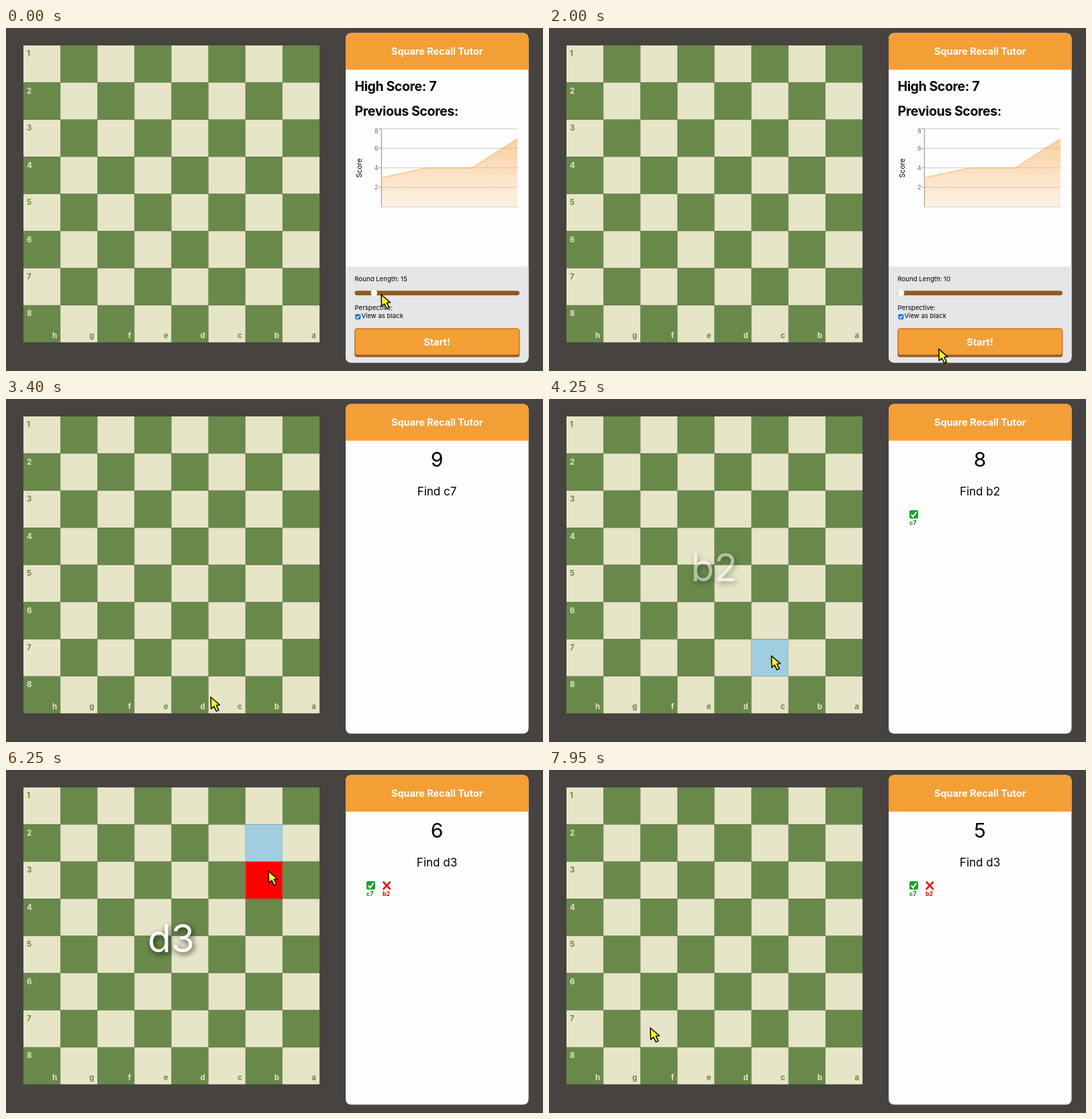
An HTML page that plays this animation: 800 by 512 pixels, repeating every 8000 ms.

```html
<!DOCTYPE html>
<html lang="en">
<head>
<meta charset="utf-8">
<title>Square Recall Tutor</title>
<style>
  html, body { margin: 0; width: 100%; height: 100%; overflow: hidden; background: #464340; }
  svg { display: block; width: 800px; height: 512px; font-family: Inter, Roboto, sans-serif; }
  .mid { text-anchor: middle; }
  .end { text-anchor: end; }
  .bold { font-weight: 700; }
  .head { font-weight: 700; font-size: 19.5px; letter-spacing: -.02em; }
  .small { font-size: 9.6px; }
  .mark { font-weight: 700; font-size: 9px; text-anchor: middle; }
  #board { font-size: 11.5px; font-weight: 700; }
  #flash { font-size: 57px; fill: #fff; filter: drop-shadow(2px 3px 4px rgba(0,0,0,.75)); }
</style>
</head>
<body>
<svg viewBox="0 0 800 512">
  <defs>
    <linearGradient id="fade" x1="0" y1="0" x2="0" y2="1">
      <stop offset="0" stop-color="#f49f36" stop-opacity=".48"/>
      <stop offset="1" stop-color="#f49f36" stop-opacity=".12"/>
    </linearGradient>
    <clipPath id="panel"><rect x="506" y="7.5" width="272.5" height="492" rx="8"/></clipPath>
  </defs>

  <g id="board"></g>
  <rect id="good" width="55.1" height="55.1" fill="#a0cee0"/>
  <rect id="bad" width="55.1" height="55.1" fill="#f00"/>
  <g id="flash"><text id="flashText" class="mid" x="246" y="272"></text></g>

  <g clip-path="url(#panel)">
    <rect x="506" y="7" width="273" height="493" fill="#fefdfe"/>
    <rect x="506" y="7" width="273" height="55.3" fill="#f49f36"/>
    <text class="mid bold" x="642.3" y="40" font-size="14.4" fill="#fff">Square Recall Tutor</text>

    <g id="menu">
      <text class="head" x="519.5" y="94">High Score: 7</text>
      <text class="head" x="519.5" y="130.5">Previous Scores:</text>
      <g id="chart" font-size="9" fill="#666"></g>
      <path d="M559 223.4L626.7 208.8H694.3L762 165V267H559Z" fill="url(#fade)"/>
      <path d="M559 223.4L626.7 208.8H694.3L762 165" fill="none" stroke="#f3b668"/>
      <text class="mid" font-size="10.5" transform="translate(530 209) rotate(-90)">Score</text>

      <rect x="506" y="356" width="273" height="144" fill="#e6e5e7"/>
      <text id="length" class="small" x="519.5" y="378"></text>
      <rect x="519.5" y="392.2" width="245.5" height="6.8" rx="3.4" fill="#8f5a24"/>
      <circle id="thumb" cy="395.6" r="4.8" fill="#fff"/>
      <text class="small" x="519.5" y="421">Perspective:</text>
      <rect x="520.3" y="427" width="8" height="8" rx="1.5" fill="#2376e0"/>
      <path d="M522 431l1.8 2L526.7 429" fill="none" stroke="#fff" stroke-width="1.2"/>
      <text class="small" x="529.5" y="432.5">View as black</text>
      <rect x="519.3" y="449" width="246" height="42.3" rx="4" fill="#8f5a20"/>
      <rect x="520" y="448.8" width="244.6" height="39" rx="3.5" fill="#f49f36" stroke="#c47e2a" stroke-width="1.4"/>
      <text class="mid bold" x="642" y="474" font-size="14.5" fill="#fff">Start!</text>
    </g>

    <g id="game">
      <text id="clock" class="mid" x="642" y="101.3" font-size="30"></text>
      <text id="find" class="mid" x="642" y="144" font-size="17"></text>
      <g id="hit">
        <rect x="537" y="166" width="13" height="12.6" rx="2" fill="#17a32a"/>
        <path d="M539.8 172.5l2.6 3.3L547.4 168.6" fill="none" stroke="#fff" stroke-width="2"/>
        <text class="mark" x="542.3" y="188" fill="#177a12">c7</text>
      </g>
      <g id="miss">
        <path d="M562.5 167.5l9.5 10M572 167.5l-9.5 10" stroke="#e8150c" stroke-width="2.6" stroke-linecap="round"/>
        <text class="mark" x="566.6" y="188" fill="#d31508">b2</text>
      </g>
    </g>
  </g>

  <path id="cursor" d="M0 0L.6 17.5L4.8 13.8L8.2 21L11.8 19.4L8.4 12.2L13.4 11.6Z"
        fill="#fdf41c" stroke="#111" stroke-width="1.6" stroke-linejoin="round"/>
</svg>

<script>
const LOOP = 8000, START = 2050, HIT = 3950, MISS = 6220, MARK_TIME = 450;
const X0 = 26, Y0 = 26, CELL = 55.125, ROW = 55.44;
const FILES = 'hgfedcba';
const $ = id => document.getElementById(id);
const show = (id, on) => $(id).setAttribute('visibility', on ? 'inherit' : 'hidden');
const set = (id, text) => { if ($(id).textContent !== text) $(id).textContent = text; };

function drawBoard() {
  const tones = ['#e7e5c7', '#69894b'];
  let out = '';
  for (let r = 0; r < 8; r++) for (let c = 0; c < 8; c++) {
    const x = X0 + c * CELL, y = Y0 + r * ROW, dark = (r + c) % 2;
    out += `<rect x="${x}" y="${y}" width="${CELL + .1}" height="${CELL}" fill="${tones[dark]}"/>`;
    const ink = tones[1 - dark];
    if (c === 0) out += `<text x="31" y="${y + 16.4}" fill="${ink}">${r + 1}</text>`;
    if (r === 7) out += `<text class="end" x="${x + CELL - 5}" y="463" fill="${ink}">${FILES[c]}</text>`;
  }
  $('board').innerHTML = out;
}

function drawChart() {
  let out = '<path d="M559.3 150.5V267" stroke="#888"/>';
  for (let v = 0; v <= 8; v += 2) {
    const y = 267 - v * 14.56;
    out += `<path d="M559 ${y}H762" stroke="#ccc"/>`;
    if (v) out += `<path d="M555.5 ${y}H559" stroke="#888"/>
      <text class="end" x="554.5" y="${y + (v === 8 ? 6.5 : 3.3)}">${v}</text>`;
  }
  $('chart').innerHTML = out;
}

function place(id, square) {
  $(id).setAttribute('x', X0 + FILES.indexOf(square[0]) * CELL);
  $(id).setAttribute('y', Y0 + (square[1] - 1) * ROW);
}

// CSS "ease" curve, cubic-bezier(.25, .1, .25, 1)
function ease(x) {
  const bez = (a, b, s) => 3 * a * s * (1 - s) ** 2 + 3 * b * s * s * (1 - s) + s ** 3;
  let lo = 0, hi = 1;
  for (let i = 0; i < 20; i++) {
    const m = (lo + hi) / 2;
    if (bez(.25, .25, m) < x) lo = m; else hi = m;
  }
  return bez(.1, 1, lo);
}

// time, x, y of the pointer tip
const PATH = [
  [0, 559, 398], [150, 559, 398], [500, 548, 395], [900, 522, 396], [1350, 567, 470],
  [1800, 580, 479], [2550, 583, 480], [3400, 305, 445], [3850, 328, 384], [4150, 330, 384],
  [5150, 375, 361], [6100, 391, 151], [6400, 391, 151], [7950, 151, 385], [8000, 151, 385]
];

function pointer(t) {
  const i = PATH.findIndex(p => p[0] > t);
  const [ta, xa, ya] = PATH[i - 1], [tb, xb, yb] = PATH[i];
  const u = (t - ta) / (tb - ta), s = u * u * (3 - 2 * u);
  return [xa + (xb - xa) * s, ya + (yb - ya) * s];
}

function render(t) {
  const [px, py] = pointer(t);
  $('cursor').setAttribute('transform', `translate(${px} ${py})`);

  const playing = t >= START;
  show('menu', !playing);
  show('game', playing);

  const drag = Math.min(1, Math.max(0, (548 - px) / 24));
  const seconds = t < 500 ? 15 : t < 900 ? Math.round(15 - 5 * drag) : 10;
  set('length', 'Round Length: ' + seconds);
  $('thumb').setAttribute('cx', 524.6 + (seconds - 10) * 4.74);

  const [goal, since] = t < HIT ? ['c7', START] : t < MISS ? ['b2', HIT] : ['d3', MISS];
  set('clock', String(10 - Math.max(0, Math.floor((t - START) / 1000))));
  set('find', 'Find ' + goal);
  set('flashText', goal);
  $('flash').style.opacity = playing ? 1 - ease(Math.min(1, (t - since) / 1000)) : 0;

  const marked = t >= HIT && t - since < MARK_TIME;
  place('good', t < MISS ? 'c7' : 'b2');
  show('good', marked);
  show('bad', marked && t >= MISS);
  show('hit', t >= HIT);
  show('miss', t >= MISS);
}

drawBoard();
drawChart();
place('bad', 'b3');
const begin = performance.now();
(function tick() {
  render((performance.now() - begin) % LOOP);
  requestAnimationFrame(tick);
})();
</script>
</body>
</html>
```
